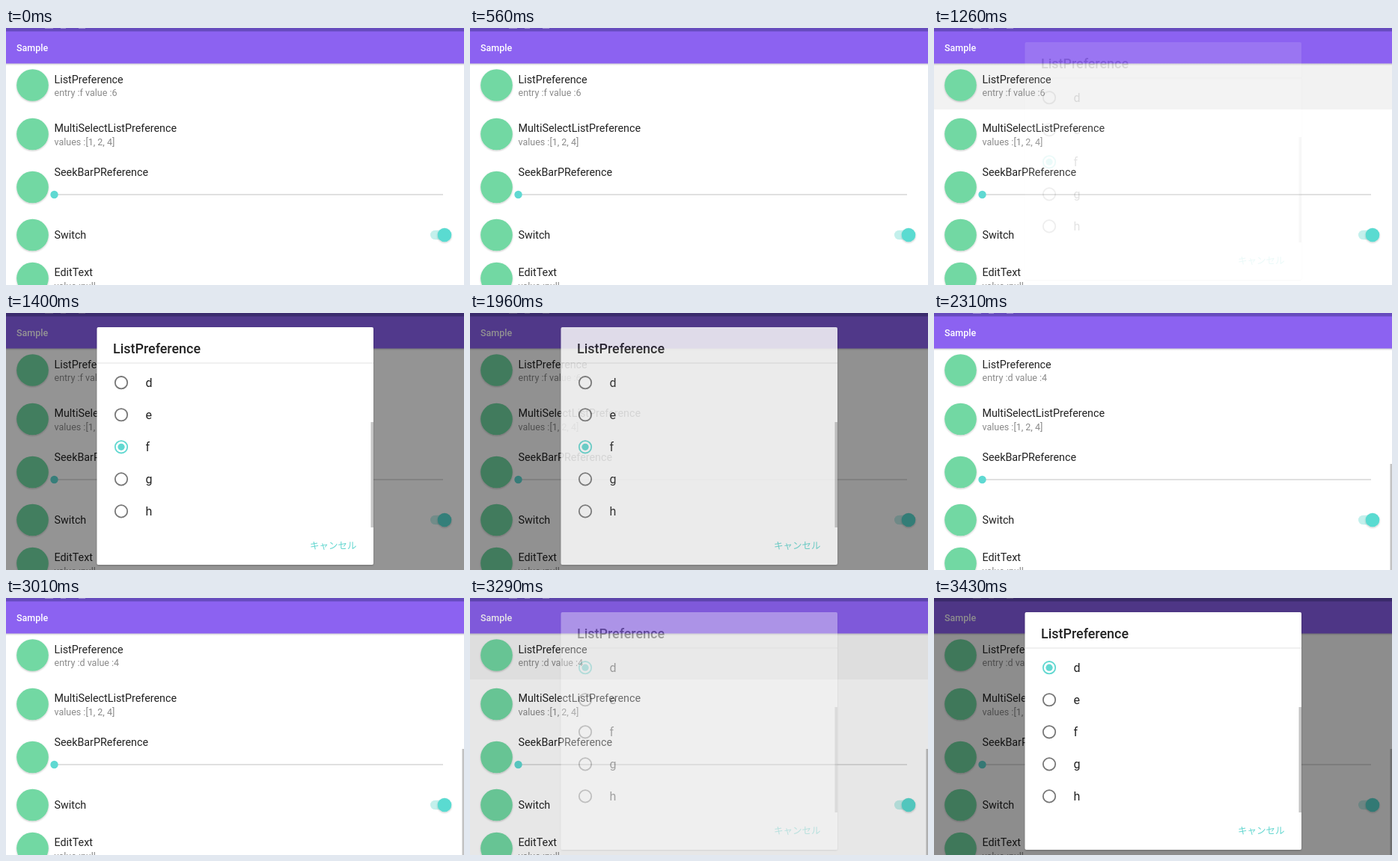
An HTML page for the animation above (3570 ms loop, 612 px wide and 344 px high).

```html
<!DOCTYPE html>
<html lang="en">
<head>
<meta charset="utf-8">
<title>Preference list</title>
<style>
  html, body { margin: 0; height: 100%; overflow: hidden; background: #fff; }
  svg { display: block; width: 100vw; height: 100vh; font-family: Roboto, "Noto Sans CJK JP", "Noto Sans CJK", sans-serif; }
  .name { font-size: 14.3px; fill: #222; }
  .note { font-size: 12.5px; fill: #8a8a8a; }
  .head { font-weight: 500; }
  .option { font-size: 16px; fill: #222; }
  .ring { fill: none; stroke: #777; stroke-width: 1.8; }
  .dot { fill: none; }
  .on .ring { stroke: #62d8d1; }
  .on .dot { fill: #62d8d1; }
</style>
</head>
<body>
<svg viewBox="0 0 612 344">
  <defs>
    <filter id="soft" x="-20%" y="-20%" width="140%" height="140%">
      <feDropShadow dx="0" dy="1" stdDeviation="1.2" flood-opacity=".25"/>
    </filter>
    <linearGradient id="fade" x2="0" y2="1">
      <stop stop-opacity=".2"/><stop offset="1" stop-opacity="0"/>
    </linearGradient>
  </defs>

  <rect width="612" height="344" fill="#fff"/>
  <rect id="press" y="48" width="612" height="61"/>
  <rect y="47" width="612" height="3.5" fill="url(#fade)"/>
  <rect width="612" height="47.5" fill="#8c62f1"/>
  <rect width="612" height="4.5" fill="#664bbd"/>
  <path d="M52 .5h11M73 .5h7M97 .5h9" stroke="#fff" stroke-opacity=".35"/>
  <text class="head" x="14" y="31" font-size="12.5" fill="#fff">Sample</text>

  <g id="rows"></g>
  <path d="M65 223H584" stroke="#d6d6d6" stroke-width="1.6"/>
  <circle cx="64.5" cy="223" r="5.2" fill="#5fd9d2"/>
  <rect x="567" y="270.8" width="28" height="12.5" rx="6.2" fill="#c3f0ec"/>
  <circle cx="586" cy="277" r="9.3" fill="#5adbd1" filter="url(#soft)"/>
  <rect id="bar" x="609.5" y="202" width="2.5" height="142" fill="#c2c2c2"/>

  <rect id="dim" width="612" height="344"/>

  <g id="dialog">
    <rect x="121.5" y="19" width="369.5" height="318" rx="2" fill="#fff" filter="url(#soft)"/>
    <text class="head" x="143" y="54" font-size="17.9" fill="#222">ListPreference</text>
    <path d="M121.5 67H491" stroke="#e2e2e2"/>
    <g id="options"></g>
    <rect x="487.5" y="146" width="3.5" height="141" fill="#c6c6c6"/>
    <text x="406" y="316" font-size="12.5" fill="#62d6cf">キャンセル</text>
  </g>
</svg>
<script>
const LOOP = 3570, STEP = 70;
const $ = id => document.getElementById(id);

// icon centre, title baseline, title, summary
const rows = [
  [76.5, 73.7, "ListPreference", " "],
  [142, 139.2, "MultiSelectListPreference", "values :[1, 2, 4]"],
  [213, 197.7, "SeekBarPReference", ""],
  [277, 282.3, "Switch", ""],
  [335, 332, "EditText", "value :null"]
];
$("rows").innerHTML = rows.map(([cy, y, name, note]) =>
  `<circle cx="35.5" cy="${cy}" r="21.3" fill="#72d8a3" filter="url(#soft)"/>
   <text class="name" x="64.5" y="${y}">${name}</text>
   <text class="note" x="64.5" y="${y + 17.6}">${note}</text>`).join("");
const summary = document.querySelector(".note");

$("options").innerHTML = [..."defgh"].map((letter, i) => {
  const y = 93.2 + i * 43.05;
  return `<g><circle class="ring" cx="154" cy="${y}" r="8.2"/>
    <circle class="dot" cx="154" cy="${y}" r="4.6"/>
    <text class="option" x="186.5" y="${y + 5.8}">${letter}</text></g>`;
}).join("");
const options = [...$("options").children];

// Linear interpolation over [time, value] pairs
function track(t, keys) {
  const i = keys.findIndex(k => k[0] > t);
  if (i < 0) return keys[keys.length - 1][1];
  if (i === 0) return keys[0][1];
  const [t0, v0] = keys[i - 1], [t1, v1] = keys[i];
  return v0 + (v1 - v0) * (t - t0) / (t1 - t0);
}

// Times relative to the tap that opens the dialog
const pressKeys = [[-70, 0], [0, .03], [70, .05], [140, .05], [280, 0]];
const showKeys = [[70, 0], [140, .12], [210, .65], [280, 1], [770, 1], [840, .82], [910, .35], [980, 0]];
const dimKeys = [[140, 0], [210, .22], [280, .42], [350, .48], [770, .48], [840, .43], [910, .29], [980, .15], [1050, .05], [1120, 0]];

function draw(now) {
  const t = Math.floor(now % LOOP / STEP) * STEP;
  const again = t >= 2800;
  const local = t - (again ? 3120 : 1120);
  const changed = t >= 2030;
  $("press").setAttribute("opacity", track(local, pressKeys));
  $("dim").setAttribute("opacity", track(local, dimKeys));
  $("dialog").setAttribute("opacity", track(local, showKeys));
  $("bar").setAttribute("opacity", changed ? 1 : 0);
  summary.textContent = changed ? "entry :d value :4" : "entry :f value :6";
  options.forEach((o, i) => o.classList.toggle("on", i === (again ? 0 : 2)));
}

const start = performance.now();
function tick() {
  draw(performance.now() - start);
  requestAnimationFrame(tick);
}
tick();
</script>
</body>
</html>
```
